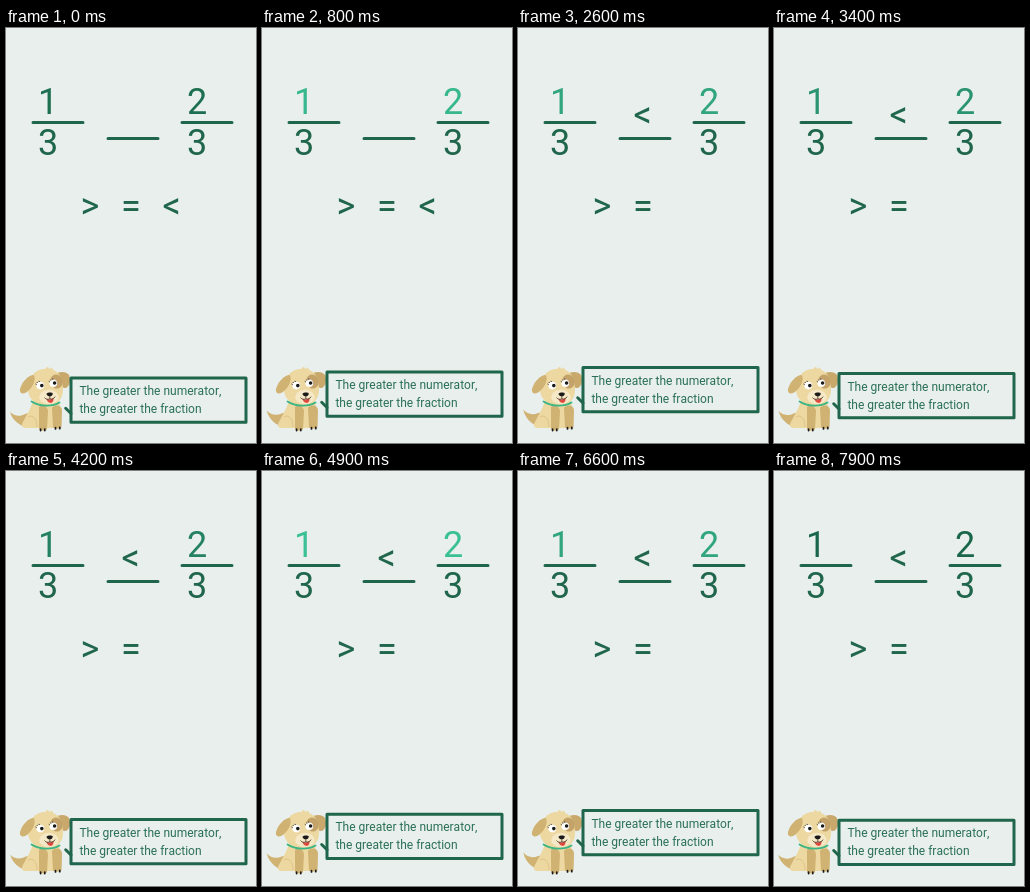
Recreate the animation shown at these times as an HTML page. Size 250 px wide and 415 px high, loop 8000 ms.

```html
<!DOCTYPE html>
<html lang="en">
<head>
<meta charset="utf-8">
<title>Comparing fractions</title>
<style>
  html, body { margin: 0; width: 100%; height: 100%; overflow: hidden; background: #e8efec; }
  svg { display: block; width: 250px; height: 415px; }
  text { font-family: Roboto, sans-serif; fill: #1f664c; font-kerning: none; }
  .big { font-size: 36px; }
  .hint { font-size: 12px; fill: #2a7057; }
  .rule { fill: none; stroke: #1f664c; stroke-width: 3; stroke-linecap: round; stroke-linejoin: round; }
  .coat { fill: #ecd8a0; }
  .tan { fill: #d0b273; }
  .ink { fill: #1b1a19; }
</style>
</head>
<body>
<svg viewBox="0 0 250 415">
  <rect width="250" height="415" fill="#e8efec"/>

  <path class="rule" d="M27 94.5H77M176 94.5H226M102 110.5H152"/>
  <g class="big">
    <text class="pulse" x="32" y="86">1</text>
    <text x="32" y="127.3">3</text>
    <text class="pulse" x="181" y="86">2</text>
    <text x="181" y="127.3">3</text>
    <text x="74.4" y="189.8">&gt;</text>
    <text x="115" y="189.8">=</text>
    <text id="answer" x="156.4" y="189.8">&lt;</text>
  </g>

  <g id="dog">
    <path id="tail" class="tan" d="M4 384C8 388 14 389 19 386C25 383 31 388 31 398C25 403 8 398 4 384Z"/>
    <!-- body and hind leg -->
    <path class="coat" d="M27 373C25 380 21 386 18 392C15 397 15 400 20 400H52C56 392 56 382 52 372Z"/>
    <path d="M22 389C27 386 31 391 31 399" fill="none" stroke="#dfc487" stroke-width="1"/>
    <!-- front legs -->
    <path class="tan" d="M33 379C36 376 42 378 42 384L41 401C40 403 34 403 33 401Z"/>
    <path class="tan" d="M46 380C49 376 56 377 56 383L55.5 399C54 401 48 401 47 399Z"/>
    <path d="M34.6 401v1.6M38.8 401v1.6M49.5 399.6v1.4M53.8 399.3v1.4" stroke="#1b1a19" stroke-width="1.7" stroke-linecap="round"/>
    <!-- head -->
    <path d="M48 347C53 343 60 343 63 347C65 352 64 358 60 360C55 361 51 354 48 347Z" fill="#c9a86c"/>
    <path class="coat" d="M25 350C28 343 34 341 39 341L42 338.5L43 341L46 339.5L47 342C54 344 57 352 57 362C57 371 51 377 41 377C31 377 23 372 22 363C22 358 23 354 25 350Z"/>
    <ellipse cx="50.5" cy="353.5" rx="6" ry="7.2" fill="#c3a36a" transform="rotate(-18 50.5 353.5)"/>
    <path class="tan" d="M28 347C22 347 16 354 14 361C13 366 18 367 22 363C27 359 30 352 28 347Z"/>
    <ellipse cx="43" cy="369" rx="9.8" ry="7.2" fill="#f5e8c6"/>
    <g fill="#fff">
      <ellipse cx="34.3" cy="357.6" rx="3.9" ry="3.8"/>
      <ellipse cx="47.3" cy="355.2" rx="3.8" ry="3.8"/>
    </g>
    <g class="ink">
      <circle cx="35.8" cy="357.6" r="1.8"/>
      <circle cx="48.6" cy="355" r="1.8"/>
      <path d="M40.5 365.8C41.5 364.2 46 364.1 46.8 365.4C46.8 367.2 44.8 368.4 43.8 368.4C42.5 368.4 40.7 367.5 40.5 365.8Z"/>
    </g>
    <path d="M30.6 356.6L29.6 356M31.6 355L30.8 354.1M33.3 354L33 352.9M43.8 354L42.8 353.3M45 352.5L44.4 351.6M46.8 351.6L46.7 350.5" fill="none" stroke="#1b1a19" stroke-width=".9"/>
    <path d="M40.6 370.8C43 372 45.5 371.4 47.5 370C47.8 374.3 45.6 375.3 43.9 374.8C42 374.4 41 373 40.6 370.8Z" fill="#e0493f"/>
    <path d="M43.8 368.3V370.8M38.5 369.5C40 371.6 42 371.7 43.8 370.8C46 371.5 48 370.6 49.2 368.6" fill="none" stroke="#3f372c" stroke-width=".8"/>
    <path d="M25.5 373.5C33 378.5 46 379.2 53.5 374.5" fill="none" stroke="#39b586" stroke-width="1.8" stroke-linecap="round"/>
  </g>

  <g id="bubble">
    <path class="rule" d="M65 350H240V394.2H65Z"/>
    <path class="rule" d="M59.7 380.3L65 385.5"/>
    <text class="hint" x="73.4" y="367">The greater the numerator,</text>
    <text class="hint" x="73.4" y="385">the greater the fraction</text>
  </g>
</svg>
<script>
  const LOOP = 8000;
  const DARK = [26, 102, 75], BRIGHT = [58, 192, 148];
  const byId = id => document.getElementById(id);
  const answer = byId('answer'), bubble = byId('bubble'), tail = byId('tail');
  const digits = document.querySelectorAll('.pulse');

  const clamp = v => Math.min(1, Math.max(0, v));
  const easeInOut = p => (1 - Math.cos(Math.PI * p)) / 2;
  // Rises from 0 to 1 and falls back once per period.
  const triangle = (t, period) => 1 - Math.abs(2 * (t % period) / period - 1);
  const move = (el, x, y) => el.setAttribute('transform', `translate(${x.toFixed(2)} ${y.toFixed(2)})`);

  function draw(time) {
    // The scene advances in steps of a tenth of a second.
    const t = Math.floor((time % LOOP) / 100) * 100;

    const drop = easeInOut(clamp((t - 1000) / 830));
    move(answer, -41 * drop, -90.5 * drop);

    const lift = triangle(t, 4000);
    move(bubble, 0, -15 * lift);
    tail.setAttribute('transform', `rotate(${(8 * lift).toFixed(2)} 29 396)`);

    const glow = triangle(t + 100, 2000);
    const rgb = DARK.map((c, i) => Math.round(c + (BRIGHT[i] - c) * glow));
    for (const d of digits) d.style.fill = `rgb(${rgb})`;
  }

  const start = performance.now();
  function tick() {
    draw(performance.now() - start);
    requestAnimationFrame(tick);
  }
  tick();
</script>
</body>
</html>
```
